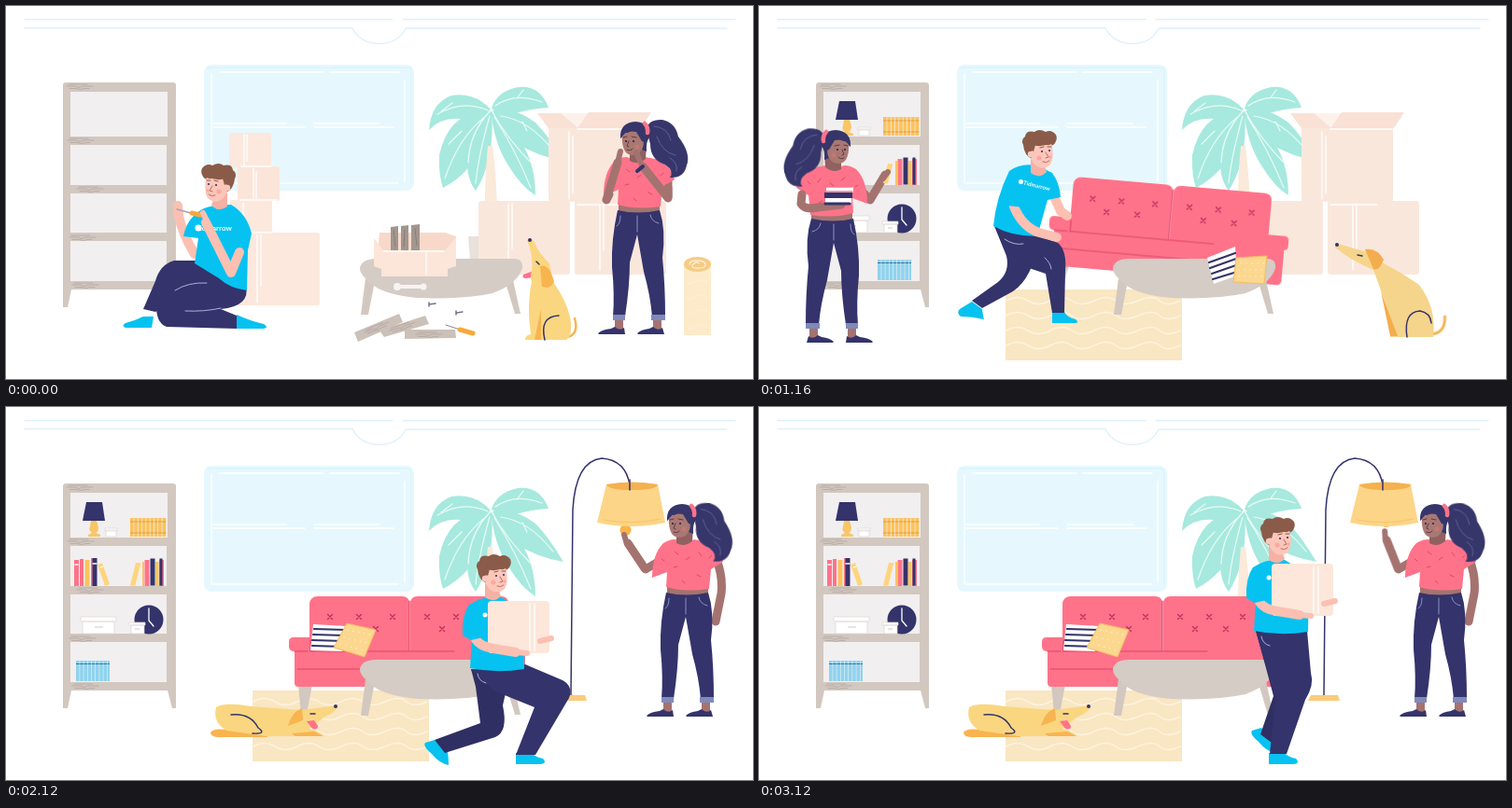
Animation of 800 by 400 pixels, one loop 3160 ms. Source, as an HTML page without scripts:

```html
<!DOCTYPE html>
<html lang="en">
<head>
<meta charset="utf-8">
<title>Moving in</title>
<style>
html,body{margin:0;width:100%;height:100%;overflow:hidden;background:#fff}
svg{display:block;width:100%;height:100%}
text{font:700 8px Lato,Inter,sans-serif;fill:#fff}
.line{fill:none;stroke-linecap:round;stroke-linejoin:round}
.white{stroke:#fff;stroke-width:1.3}
.navy{stroke:#34336b;stroke-width:1.5}
.skin{stroke:#fbc0b2;stroke-width:10}
.brown{stroke:#a47370;stroke-width:9}
.stripe{stroke-width:2.2}
.hand{stroke-width:6}
.seam{stroke:#aab4dc}
.grain{stroke:#b3a69f;stroke-width:.8}
.a,.b,.c,.ab,.bc{animation:3.16s step-end infinite}
.a{animation-name:a}.b{animation-name:b}.c{animation-name:c}
.ab{animation-name:ab}.bc{animation-name:bc}
@keyframes a{0%{visibility:visible}32.911%,100%{visibility:hidden}}
@keyframes b{0%{visibility:hidden}32.911%{visibility:visible}65.823%,100%{visibility:hidden}}
@keyframes c{0%{visibility:hidden}65.823%,100%{visibility:visible}}
@keyframes ab{0%{visibility:visible}65.823%,100%{visibility:hidden}}
@keyframes bc{0%{visibility:hidden}32.911%,100%{visibility:visible}}
.m{animation:var(--k) 3.16s ease-in-out infinite}
@keyframes hair{0%,32.9%,65.8%,100%{transform:rotate(0)}16.5%,49.4%,82.9%{transform:rotate(5deg)}}
@keyframes tail{0%,16.5%,32.9%,49.4%,65.8%,100%{transform:rotate(0)}8.2%,24.7%,41.1%,57.6%{transform:rotate(10deg)}}
@keyframes nod{0%,32.9%,100%{transform:none}16.5%{transform:translate(-3px,.5px)}}
@keyframes cheer{0%,32.9%,100%{transform:none}16.5%{transform:translate(0,2px)}}
@keyframes sofa{0%,36.7%{transform:translate(3px,-.5px) rotate(5deg)}57%{transform:translate(3px,-1px) rotate(1.8deg)}65.8%,100%{transform:none}}
@keyframes bend{0%,36.7%{transform:none}57%,100%{transform:translate(-1px,6.5px)}}
@keyframes squat{0%,36.7%{transform:none}57%,100%{transform:scaleY(.925)}}
@keyframes carry{0%,67.09%{transform:translate(0,40px)}80%,81%{transform:none}90%{transform:translate(17px,-2px)}98.73%,100%{transform:translate(33px,0)}}
@keyframes front{
0%,67.09%{d:path("M498 282L556 276L596 293Q608 300 603 312L567 373L546 373L566 322L524 305Z")}
80%,81%{d:path("M498 241L556 241L564 290Q566 300 565 312L564 366L547 366L541 305L512 280Z")}
98.73%,100%{d:path("M532 240L587 240L591 285Q595 298 585 314L565 372L547 372L553 312L545 285Z")}}
@keyframes back{
0%,67.09%{d:path("M498 281L540 285L532 320Q538 348 524 354L470 371L459 357L508 339L503 300Z")}
80%,81%{d:path("M498 241L545 243L533 290Q526 306 516 316L474 370L458 358L488 306L496 280Z")}
98.73%,100%{d:path("M532 240L575 242L580 280Q582 300 573 315L549 360L537 351L551 310L543 280Z")}}
@keyframes step{0%,81%{transform:none}98.73%,100%{transform:translate(79px,-13px)}}
@keyframes reach{0%,67.09%{transform:none}78%,100%{transform:rotate(12deg)}}
@keyframes bulb{0%,67.09%{transform:none}78%,100%{transform:translate(8px,-9px)}}
</style>
</head>
<body>
<svg viewBox="0 0 800 400" preserveAspectRatio="none">
<defs>
  <path id="grain" class="line grain" d="M0 0h9q4 3 8 0h11M3 2.5h7q5 2 9 0h5M2-2h20"/>
  <path id="cross" class="line" stroke="#bd2f59" stroke-width="1.3" d="M-2.5-2.5l5 5m0-5l-5 5"/>
  <path id="wave" class="line" stroke="#fdf3df" stroke-width="1.5" d="M265 0q12-7 23 0t24 0 23 0 24 0 23 0 24 0 23 0 22 0"/>
  <g id="head">
    <path fill="#f5b1a3" d="M-9 9-9 24Q0 31 8 23L5 14Z"/>
    <path fill="#8b5b49" d="M-17-6Q-20-12-15-15-14-22-5-20 0-24 7-20 13-23 18-17 20-12 17-8 14-4 8-5L-4 0-7 9Q-16 6-17-6Z"/>
    <path fill="#fcc7ba" d="M-7-6Q2-3 13-8 17 7 12 15 7 20 0 18-7 15-9 6Z"/>
    <circle cx="-9" cy="4" r="3.2" fill="#fcc7ba"/>
    <path fill="#8b5b49" d="M-10-1-5-12Q7-17 16-9 11-4 6-7 1-4-4-6L-6 1Z"/>
    <g fill="#fba9a0"><circle cx="0" cy="8" r="2.6"/><circle cx="12" cy="7" r="1.7"/></g>
    <g fill="#34336b"><circle cx="3" cy="1" r="1.1"/><circle cx="11" cy="0" r="1.1"/></g>
    <path class="line" stroke="#b5605c" stroke-width=".9" d="M7 2l3 5-3 1M4 12q4 2 7-1"/>
    <path class="line" stroke="#7a4d3f" stroke-width=".9" d="M1-3l4-1M9-4l4 0"/>
  </g>
  <g id="whead">
    <g class="m" style="--k:hair;transform-origin:688px 132px">
      <path fill="#37366b" d="M686 132Q688 121 703 122 717 125 720 140 734 158 729 171 726 185 711 184 716 177 706 170 690 165 690 148Z"/>
      <path class="line" stroke="#6264a0" stroke-width=".9" d="M694 129q15 1 18 15M697 140q6 17 20 20M711 163q9 5 7 14"/>
    </g>
    <path fill="#906160" d="M668 156V166Q676 171 685 164L686 148Z"/>
    <path fill="#37366b" d="M658 142Q657 125 674 124 691 125 689 141 685 146 686 156L676 152 664 136Z"/>
    <path fill="#a97873" d="M660 138Q659 149 663 156 668 162 676 159 683 155 683 145L676 132Z"/>
    <path fill="#37366b" d="M658 142Q659 126 676 126 687 130 686 147L681 145 675 135 665 134Z"/>
    <path class="line" stroke="#ff738a" stroke-width="4.500" d="M684 126q4 4 3 10"/>
    <g fill="#25244f"><circle cx="664" cy="145" r="1.100"/><circle cx="672" cy="145" r="1.100"/></g>
    <circle cx="676" cy="151" r="2.500" fill="#c17a76"/>
    <path class="line" stroke="#5a3039" stroke-width=".9" d="M661 141l4-1M670 140l5 1M667 145l-2 5 2 1M665 154q4 2 6-1"/>
  </g>
  <g id="wbody">
    <path fill="#a47370" d="M652 336h9v12h-9zM693 336h9v12h-9zM656 206h44v16h-44z"/>
    <path fill="#34336b" d="M655 219Q648 250 649 280 652 310 650 333H663Q668 300 668 275L676 245 683 285Q690 310 692 333H706Q706 300 703 270 707 240 700 219Q676 224 655 219Z"/>
    <path class="line" stroke="#8794c2" d="M658 225q0 9-4 11M690 224q1 7 9 9M676 225v17"/>
    <path fill="#7f8abb" d="M650 331h13v6h-13zM691 331h15v6h-15z"/>
    <path fill="#34336b" d="M634 351Q638 347 648 346L652 344Q657 349 662 345L663 352H635ZM676 351Q680 347 689 346L693 344Q698 349 703 345L705 352H677Z"/>
    <path fill="#ff738a" d="M652 166Q662 160 668 163 676 168 685 162L700 165Q712 172 716 186L703 194 701 215Q675 219 655 213L656 197 640 203Q640 178 652 166Z"/>
    <path class="line" stroke="#d94a6b" d="M664 175l4 3M676 184l4-3M690 176l3 4M663 192l4-1M688 200l4 2M672 206l3 3M701 182l3-3M650 183l3 2"/>
  </g>
  <path id="book" fill="#fed57d" d="M0 0l7-1 0 24-7 1z"/>
</defs>

<path class="line" stroke="#dcf0fb" stroke-width="1.3" d="M20 14.500H414M425 14.500H781M20 23.500H371Q379 40 400 40.500 420 40 428 24H772"/>
<rect x="212" y="63" width="225" height="135" rx="8" fill="#e6f8fe"/>
<path class="line" stroke="#d9f4fd" stroke-width="1.5" d="M216 66H430Q434 66 434 72V190"/>
<path class="line white" d="M220 73V190M229 71H340M347 71H421M427 80V188M222 190H420M222 130H320M222 126H300M330 130H415M330 126H400"/>

<!-- palm -->
<g fill="#a7e9de">
  <path d="M519 111Q502 92 477 96 455 104 453 133 466 119 487 121 506 121 519 111Z"/>
  <path d="M517 112Q474 113 464 160 463 180 468 195 512 172 518 114Z"/>
  <path d="M518 113Q494 142 494 172 495 188 503 198 524 165 520 114Z"/>
  <path d="M519 112Q523 148 538 171 552 194 567 203 567 162 544 136Z"/>
  <path d="M521 112Q545 108 567 125 581 139 597 166 568 161 545 146 530 131 521 112Z"/>
  <path d="M520 110Q525 92 548 87 572 84 581 109 563 110 546 115 530 117 520 110Z"/>
</g>
<path class="line" stroke="#e9fbf7" stroke-width="1.200" d="M516 112Q490 100 462 116M514 118Q485 140 470 185M518 118Q506 160 503 190M523 119Q546 155 562 195M530 118Q560 122 586 155M524 107Q545 92 574 103M519 112Q496 136 495 168M520 112Q536 142 566 172M478 104l-12 9M488 134l-14 14M553 124l5 10M548 98l6-8"/>
<path fill="#fbe9d9" d="M516 150Q512 190 513 250H527Q526 190 521 150Z"/>
<path fill="#e9e1db" d="M495 247H511L508 272H497Z"/>

<!-- shelf -->
<path fill="#d2c8c0" d="M61 85Q61 82 64 82H179Q182 82 182 85V323H178L173 304H70L66 323H61Z"/>
<path fill="#f2eff0" d="M69 92H173V140H69ZM69 149H172V192H69ZM69 201H172V243H69ZM69 252H172V295H69Z"/>
<use href="#grain" x="65" y="86"/><use href="#grain" x="66" y="144"/><use href="#grain" x="76" y="196"/><use href="#grain" x="68" y="248"/><use href="#grain" x="71" y="299"/>
<g class="bc">
  <path fill="#34336b" d="M86 102H103L106 122H82Z"/>
  <path fill="#f9c667" d="M91 122h6l2 7q0 5-3 6l5 2v2H88v-2l4-2q-4-3-2-7z"/>
  <circle cx="153" cy="228" r="15.500" fill="#34336b"/>
  <path class="line white" d="M153 216V229L158 235"/>
  <path fill="#fff" stroke="#ded6d2" stroke-width=".7" d="M107 132h11v7h-11zM106 130h13v3h-13zM82 230h34v13H82zM80 225h38v5H80zM134 234h14v9h-14zM132 231h17v3h-17z"/>
  <path stroke="#d3c9c2" d="M95 236h9M138 238h5"/>
  <path stroke="#fbc35f" stroke-width="20" stroke-dasharray="3.600 .7" d="M133 129H172"/>
  <path stroke="#d99a41" stroke-dasharray="3.600 .7" d="M133 123H172M133 135H172"/>
  <path stroke="#ff738a" stroke-width="28" stroke-dasharray="5 10.500 5 99" d="M148.500 178H172"/>
  <path stroke="#34336b" stroke-width="29" stroke-dasharray="5 5 3 99" d="M154.500 177H172"/>
  <path stroke="#fbc35f" stroke-width="26" d="M146 179h2M160 179h3.500"/>
</g>
<g class="c">
  <use href="#book" transform="translate(139 167) rotate(14) scale(.75 1.050)"/>
  <path fill="#ff738a" d="M73 164h5v28h-5zM79 163h4v29h-4zM91 162h4v30h-4z"/>
  <path fill="#fbc35f" d="M84.500 164h5v28h-5z"/>
  <path fill="#34336b" d="M92.500 162h5v30h-5z"/>
  <path fill="#fed57d" d="M98 169l5-2 8 23-5 2z"/>
  <path class="line white" d="M74 169h3M93 168h4M101 172l3-1"/>
</g>
<g stroke="#8fd3ee" stroke-width="22" stroke-dasharray="3.600 .6">
  <path class="c" d="M75 283H111"/><path class="b" d="M127 283H163"/>
</g>
<g stroke="#35709c" stroke-dasharray="3.600 .6">
  <path class="c" d="M75 275.500H111"/><path class="b" d="M127 275.500H163"/>
</g>

<!-- packing boxes -->
<g class="a">
  <g fill="#fce8dd">
    <rect x="240" y="208" width="45" height="37" rx="2"/><rect x="239" y="136" width="45" height="37" rx="2"/>
    <rect x="248" y="172" width="45" height="37" rx="2" fill="#fbe5d9"/><rect x="240" y="243" width="96" height="78" rx="3"/>
  </g>
  <path class="line white" d="M255 138V171M258 138V166M265 174V206M268 178V206M254 211V241M269 246V318M273 246V300M252 172h32M250 208h40M245 243h40"/>
</g>
<g class="ab">
  <g fill="#fae7dc">
    <rect x="506" y="209" width="98" height="79" rx="3"/><rect x="609" y="209" width="98" height="79" rx="3"/>
    <path fill="#fdf2eb" d="M594 115H660V135H594Z"/>
    <path d="M581 131H679V207Q679 210 676 210H584Q581 210 581 207Z"/>
    <path fill="#f9e1d5" d="M569 115H594L613 131H581ZM624 114H691L680 131H612Z"/>
  </g>
  <path class="line white" d="M603 135V207M607 140V200M538 212V282M542 212V260M636 213V283M640 213V262M612 132H678M612 213h50"/>
</g>
<g class="a">
  <path fill="#fceac9" d="M726 277H755V353H726Z"/><ellipse cx="740.500" cy="277" rx="14.500" ry="8" fill="#f6cb83"/>
  <path class="line" stroke="#fdefd3" stroke-width="1.300" d="M732 277q0-4 8-4t9 4-8 4-5-4 6-1M728 296q5 4 10 0t14 0M728 312q5 4 10 0t14 0M728 328q5 4 10 0t14 0M728 344q5 4 10 0t14 0"/>
</g>

<!-- rug, lamp, sofa -->
<g class="bc">
  <path fill="#f9e6c2" d="M264 304H453V380H264Z"/>
  <use href="#wave" y="316"/><use href="#wave" y="332"/><use href="#wave" y="348"/><use href="#wave" y="364"/>
</g>
<g class="c">
  <path class="line navy" d="M605 309L607 110Q610 58 638 55 664 57 668 84"/>
  <path fill="#fbca7b" d="M591 309H620L622 315H588Z"/>
  <circle class="m" style="--k:bulb" cx="663.500" cy="132" r="6" fill="#fbb445"/>
  <path fill="#fdd588" d="M643 83Q670 79 698 83L706 124Q670 132 633 124Z"/>
  <path fill="#f5b14f" d="M643 83Q670 78 698 83 697 89 670 89 645 89 643 83Z"/>
  <path class="line navy" d="M668 78V89"/><path class="line" stroke="#f9c469" d="M640 121Q670 127 701 120"/>
</g>
<g class="bc"><g class="m" style="--k:sofa;transform-origin:555px 300px">
  <path fill="#d2c8c0" d="M313 298H328L322 329H316Z"/>
  <g fill="#ff738a">
    <path d="M325 211Q326 203 334 203H424Q432 203 432 211V264H325ZM433 211Q433 203 441 203H530Q538 203 538 211V264H433Z"/>
    <path d="M303 252Q303 247 308 247H326V262H536V247H555Q560 247 560 252V258Q560 262 556 262V296Q555 300 551 300H313Q309 300 309 296V262Q303 262 303 257Z"/>
  </g>
  <path class="line" stroke="#dd4569" stroke-width="1.200" d="M432 208V262M326 250V262H480M312 281H455M309 262h14"/>
  <g id="tufts"><use href="#cross" x="347" y="225"/><use href="#cross" x="378" y="225"/><use href="#cross" x="414" y="225"/><use href="#cross" x="363" y="238"/><use href="#cross" x="396" y="238"/></g>
  <use href="#tufts" x="104"/>
</g></g>
<g class="c">
  <path fill="#fff" d="M329 233L365 235 360 262 326 261Z"/>
  <path class="line navy stripe" d="M330 238l34 1M329 244l33 1M328 250l33 1M328 256l32 1"/>
  <path fill="#fbd78f" stroke="#f3bd62" d="M365 232L396 239 384 268 351 258Z"/>
  <path class="line" stroke="#fff0cc" stroke-width="1.500" stroke-dasharray="0 6" d="M366 239l24 5M362 247l25 6M358 254l25 7"/>
</g>

<!-- table -->
<path fill="#d2c8c0" d="M385 292L380 331H388L394 300ZM536 300L545 330H551L543 294Z"/>
<path fill="#d5ccc5" d="M379 281Q381 271 396 271H544Q554 271 553 281 548 298 521 308 490 315 440 313 397 309 384 291 379 286 379 281Z"/>
<g class="b">
  <path fill="#fff" d="M480 270L510 258 512 289 487 298Z"/>
  <path class="line navy stripe" d="M482 275l28-10M483 281l28-10M485 287l26-9M486 293l26-8"/>
  <path fill="#fbd78f" stroke="#f3bd62" d="M511 270L544 268 541 298 508 296Z"/>
  <path class="line" stroke="#fff0cc" stroke-width="1.500" stroke-dasharray="0 6" d="M516 276h25M514 283h25M514 290h25"/>
</g>

<!-- unpacking -->
<g class="a">
  <path fill="#f8d9c9" d="M400 243H470L482 247V264H398Z"/>
  <path fill="#a2968f" d="M412 237l8-1v28h-8zM423 236l8-1v30h-8zM434 235l9-1v30h-9z"/>
  <path class="line" stroke="#7f736e" stroke-width=".7" d="M415 240l2 18M427 240l-1 18M438 239l2 18"/>
  <path fill="#fce5d9" d="M394 249L404 262H470L482 248V279L473 282V290H402V282L394 279Z"/>
  <path class="line white" d="M450 265V288M404 263H469"/>
  <path class="line" stroke="#f6f4f3" stroke-width="4" d="M421 301H446"/><circle cx="419" cy="301" r="4" fill="#f6f4f3"/><circle cx="447" cy="301" r="3.500" fill="#f6f4f3"/>
  <path fill="#cbc1b9" d="M373 350L421 330 425 339 377 360ZM400 348L449 332 453 341 405 355ZM427 347L481 347 482 356 427 357Z"/>
  <use href="#grain" transform="translate(384 350) rotate(-23)"/><use href="#grain" transform="translate(411 348) rotate(-18)"/><use href="#grain" x="439" y="352"/>
  <path class="line" stroke="#777588" stroke-width="1.500" d="M453 318v4M453 320l7-1M482 327v4M483 329l6-1"/>
  <path class="line" stroke="#8a8795" d="M471 342l15 5"/><path class="line" stroke="#f6a93d" stroke-width="5" d="M486 347l14 4"/>
</g>

<!-- dogs -->
<g class="a">
  <path class="line m" style="--k:tail;transform-origin:600px 355px" stroke="#f8b44f" stroke-width="2.500" d="M601 355Q614 352 609 335"/>
  <path fill="#fad680" d="M564 290L586 296Q603 320 605 340 606 355 600 358H556Q556 353 562 352 557 320 564 290Z"/>
  <path fill="#ff738a" d="M565 284L554 288Q552 292 557 292L565 291Z"/>
  <path fill="#fad680" d="M558 251Q562 247 565 252 571 266 582 276L586 298 565 300Q560 293 563 284 565 268 558 251Z"/>
  <circle cx="561" cy="251" r="2" fill="#34336b"/>
  <path fill="#f8b44f" d="M572 279Q582 276 587 296 583 304 574 301ZM573 325L566 358H573Z"/>
  <path class="line navy" d="M577 358Q571 333 592 332M568 274l3 3"/>
</g>
<g class="b">
  <path class="line m" style="--k:tail;transform-origin:720px 352px" stroke="#f4b556" stroke-width="3" d="M718 352Q735 351 733 332"/>
  <path fill="#f5d58c" d="M617 254Q640 261 652 264L667 275Q690 287 707 299 726 324 722 355H676Q675 352 681 349 668 310 658 283 634 273 617 259Z"/>
  <circle cx="619" cy="256" r="2" fill="#34336b"/>
  <path fill="#f4ad4e" d="M649 261Q662 259 669 272 664 285 658 282ZM666 306L684 354H676Z"/>
  <path class="line navy" d="M694 355Q690 328 708 327 719 329 720 340M641 267l5 1"/>
</g>
<g class="c">
  <path fill="#f8b44f" d="M219 349Q222 344 236 346L280 350V354H232Q219 355 219 349Z"/>
  <path fill="#fad680" d="M225 322Q235 316 262 321L316 325 355 320Q357 325 340 333L325 345Q338 349 340 353H278L236 347Q221 338 225 322Z"/>
  <path fill="#ff738a" d="M322 337L328 345Q334 347 334 342L330 336Z"/>
  <path fill="#f8b44f" d="M317 323Q306 327 302 342L318 336ZM306 350L330 348 340 353H310Z"/>
  <circle cx="353" cy="321" r="2" fill="#34336b"/>
  <path class="line navy" d="M241 330Q262 328 270 344 280 351 264 350M326 329h5"/>
</g>

<!-- first scene people -->
<g class="a">
  <path fill="#06c2f1" d="M147 333Q139 337 128 340 123 343 128 345H156L158 333ZM247 331Q262 338 276 341 282 345 276 346H247Z"/>
  <path fill="#34336b" d="M206 273H180Q165 277 160 295L147 325 160 328 195 302 240 300Z"/>
  <path fill="#34336b" d="M203 290Q165 302 161 318 160 340 172 344L247 346V332L230 325Q262 322 257 300L230 284Z"/>
  <path class="line seam" d="M181 305Q195 296 215 297M192 327Q212 328 230 324"/>
  <g class="m" style="--k:nod"><path class="line skin" d="M184 214L185 225Q189 245 202 266"/></g>
  <path fill="#06c2f1" d="M212 217Q222 213 241 213 258 223 263 244L259 262 258 305Q240 303 228 292L202 276 206 249 190 247Q194 226 212 217Z"/>
  <circle cx="206" cy="238" r="3.500" fill="#fff"/>
  <text x="203" y="241">Tidmarrow</text>
  <g class="m" style="--k:nod">
    <use href="#head" transform="translate(228 191) scale(-1 1)"/>
    <path class="line" stroke="#a6a3b3" stroke-width="1.500" d="M183 218L198 222"/>
    <path class="line" stroke="#f6a93d" stroke-width="5" d="M199 222L212 225"/>
    <path class="line skin" d="M250 264L241 286 214 232"/>
    <path class="line skin hand" d="M211 222l4 8"/>
  </g>
</g>
<g class="a">
  <path class="line brown" d="M709 188V205L684 177"/>
  <use href="#wbody"/>
  <g class="m" style="--k:cheer">
    <use href="#whead"/>
    <path class="line brown" d="M646 202L643 208 655 168M709 195V206L682 172"/>
    <path class="line brown hand" d="M656 164l2-8M679 167l-4-10"/>
    <path class="line" stroke="#34336b" stroke-width="4" d="M676 177l6-5"/>
  </g>
</g>

<!-- second scene people -->
<g class="b">
  <path class="line brown" d="M107 195L119 208 135 181"/>
  <g transform="translate(756 9) scale(-1 1)"><use href="#wbody"/><use href="#whead"/></g>
  <path class="line brown" d="M46 202L45 212Q49 219 63 216L88 213"/>
  <path fill="#fff" d="M72 194h29v6H72zM71 206h28v5H71z"/><path fill="#34336b" d="M70 200h30v6H70z"/>
  <path class="line" stroke="#ff738a" stroke-width="1.500" d="M72 194H100M72 199H100"/>
  <path class="line" stroke="#34336b" stroke-width="3" d="M71 212H97"/>
  <use href="#book" transform="translate(138 169) rotate(14) scale(.75 .9)"/>
  <path class="line brown hand" d="M133 185l5-7"/>
</g>
<g class="b">
  <path fill="#06c2f1" d="M228 317L239 325Q240 333 241 336 227 333 216 333 211 329 215 325ZM314 328H327Q330 334 339 336 344 340 338 340H314Z"/>
  <g class="m" style="--k:squat;transform-origin:0 328px">
    <path fill="#34336b" d="M252 236L300 250Q293 292 272 306L239 324 228 316 256 296Q269 285 265 268Z"/>
    <path fill="#34336b" d="M252 236L298 246 320 254Q330 262 328 285L327 329H314L307 287 286 280Z"/>
    <path class="line seam" d="M263 250q10 7 20 5M306 270q6 5 7 12"/>
  </g>
  <g class="m" style="--k:bend">
    <path class="line skin" d="M315 202L323 220 330 225"/>
    <path fill="#06c2f1" d="M268 177Q282 167 300 172L314 179Q322 190 323 205L309 208 298 247Q270 247 251 236 254 205 268 177Z"/>
    <use href="#head" x="300" y="155"/>
    <path class="line skin" d="M273 215Q282 237 300 243L319 248"/>
    <path fill="#06c2f1" d="M264 187L282 190 284 216 266 214Z"/>
    <g transform="translate(278 190) rotate(14)"><circle cx="2" cy="-2" r="2.500" fill="#fff"/><text x="5" y="0" style="font-size:6px">Tidmarrow</text></g>
  </g>
</g>

<!-- third scene people -->
<g class="c">
  <path class="line brown" d="M761 164Q768 182 766 200L760 230"/>
  <path class="line brown" d="M700 165L685 174"/>
  <g class="m" style="--k:reach;transform-origin:684px 174px">
    <path class="line brown" d="M684 173L666 146"/>
    <path class="line brown hand" d="M664 144l-2-7"/>
  </g>
  <use href="#wbody" x="52" y="-20"/><use href="#whead" x="50" y="-20"/>
</g>
<g class="c">
  <path class="m" style="--k:step" fill="#06c2f1" d="M459 357L473 369Q474 377 474 384 464 382 456 372 446 364 449 360Z"/>
  <path fill="#06c2f1" d="M546 371H563Q566 375 575 377 580 382 573 383H546Z"/>
  <path class="m" style="--k:back" fill="#302f63" d="M498 281L540 285L532 320Q538 348 524 354L470 371L459 357L508 339L503 300Z"/>
  <path class="m" style="--k:front" fill="#34336b" d="M498 282L556 276L596 293Q608 300 603 312L567 373L546 373L566 322L524 305Z"/>
  <g class="m" style="--k:carry">
    <path fill="#06c2f1" d="M496 172Q510 162 530 164L548 175 556 190 555 241Q525 246 497 240L499 208 489 205Q488 183 496 172Z"/>
    <path class="line seam" d="M505 246q1 8 9 10"/>
    <circle cx="513" cy="183" r="2.500" fill="#fff"/>
    <use href="#head" x="522" y="140"/>
    <rect x="516" y="168" width="66" height="56" rx="4" fill="#fce7da"/>
    <path class="line white" d="M561 171V221M566 171V221"/>
    <path class="line skin" d="M503 209Q508 217 522 219L546 223"/>
    <path class="line skin hand" d="M572 211l12-3M546 223l12 1"/>
    <path fill="#06c2f1" d="M490 190L508 188 511 207 498 210 489 205Z"/>
  </g>
</g>
</svg>
</body>
</html>
```
